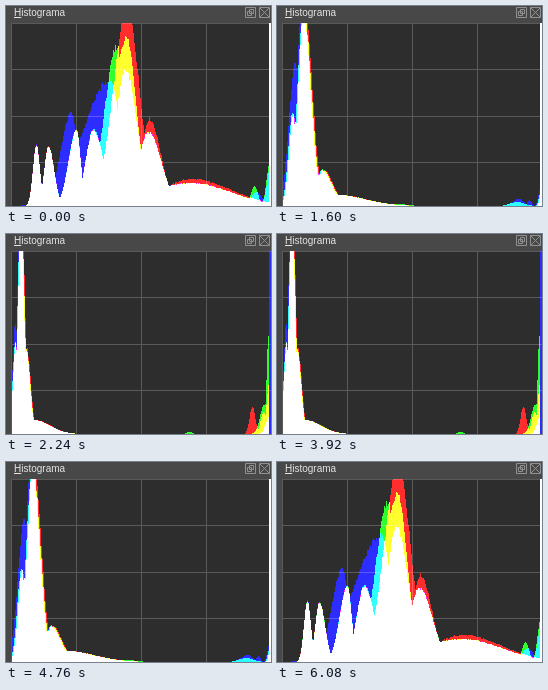
Write an HTML page with a canvas that moves like this. It is 265x200 px and loops after 6760 ms.

```html
<!DOCTYPE html>
<html lang="es">
<head>
<meta charset="utf-8">
<title>Histograma</title>
<style>
html, body { margin: 0; width: 100%; height: 100%; overflow: hidden; background: #484848; }
canvas, svg { position: absolute; left: 0; top: 0; }
h1 { position: absolute; left: 8px; top: 1px; margin: 0; font: 10px/12px "Liberation Sans", sans-serif; color: #e4e4e4; }
</style>
</head>
<body>
<canvas width="265" height="200"></canvas>
<h1><u>H</u>istograma</h1>
<svg width="265" height="17" fill="none" stroke="#909090">
  <path d="M239.5 1.5h10v10h-10zM243.5 3.5h4v4h-4zM241.5 5.5h4v4h-4zM253.5 1.5h10v10h-10zM254 2l9 9m0-9l-9 9"/>
</svg>
<script>
const LEFT = 6, TOP = 17, BOTTOM = 200;
const ctx = document.querySelector('canvas').getContext('2d');

// A bell curve whose two sides may fall off at different rates.
const hump = (center, height, left, right = left) => x => {
  const d = x - center;
  return height * Math.exp(-((d / (d < 0 ? left : right)) ** 2));
};

// "all" is shared by the channels; "shift" moves it right for red, left for blue.
const bright = {
  shift: 0, edge: '#fff',
  all: [hump(30, 61, 5), hump(42, 60, 6, 8), hump(70, 76, 11, 6), hump(87, 76, 11, 14),
    hump(142, 74, 14, 18), hump(185, 23, 60, 55)],
  r: [hump(121, 195, 20, 17), hump(143, 87, 12, 16), hump(185, 27, 40, 55)],
  g: [hump(111, 160, 18, 8), hump(120, 168, 20, 14), hump(248, 20, 5), hump(264, 48, 5)],
  b: [hump(65, 93, 15, 8), hump(104, 126, 38, 14), hump(119, 136, 14, 16), hump(250, 14, 8), hump(264, 38, 5)]
};
const medium = {
  shift: 1.5, edge: '#fff',
  all: [hump(16, 80, 5), hump(47, 200, 13, 12), hump(67, 59, 14, 13), hump(90, 15, 30, 65), hump(264, 56, 4)],
  r: [hump(33, 85, 9)],
  g: [hump(23, 85, 4), hump(35, 110, 10), hump(178, 6, 10)],
  b: [hump(27, 105, 10), hump(46, 195, 19, 10), hump(230, 3, 30)]
};
const dim = {
  shift: 1, edge: '#fff',
  all: [hump(15, 92, 6), hump(26, 200, 8.5, 11), hump(45, 36, 10, 14), hump(60, 11, 20, 40), hump(264, 18, 3)],
  r: [],
  g: [hump(120, 2, 14), hump(240, 4, 10)],
  b: [hump(18, 145, 9, 6), hump(242, 7, 10, 6), hump(252, 6, 3)]
};
const dark = {
  shift: 0.5, edge: '#22f',
  all: [hump(9, 92, 4, 3), hump(14.5, 230, 4.5, 4.8), hump(20, 85, 4, 5.5), hump(28, 14, 10, 22)],
  r: [hump(246, 27, 4), hump(257, 22, 4), hump(263, 52, 4)],
  g: [hump(183, 2, 4), hump(258, 30, 6), hump(262, 101, 2.5)],
  b: [hump(9, 112, 4, 3), hump(263, 18, 5)]
};
const darkest = {
  shift: 0, edge: null,
  all: [hump(8.5, 260, 9, 3.4), hump(12, 85, 3, 6), hump(20, 8, 10)],
  r: [hump(168, 11, 8, 12), hump(193, 18, 10)],
  g: [hump(175, 5, 10), hump(194, 31, 9, 8)],
  b: [hump(72, 3, 25, 8), hump(170, 4, 10), hump(198, 20, 8, 3), hump(203, 43, 4)]
};

const DURATION = 6760;
const schedule = [
  [0, bright], [920, medium], [1600, dim], [2240, dark], [3040, darkest],
  [3920, dark], [4760, dim], [5400, medium], [6080, bright]
];

// Repeatable roughness, from -1 to 1.
function grain(x, seed) {
  const n = Math.sin(x * 12.9898 + seed * 78.233) * 43758.5453;
  return 2 * (n - Math.floor(n)) - 1;
}

function drawChannel(shared, own, shift, color, seed) {
  ctx.fillStyle = color;
  for (let x = LEFT; x < 263; x++) {
    const level = Math.max(...shared.map(f => f(x - shift)), ...own.map(f => f(x)));
    const rough = level * (1 + 0.025 * grain(x, seed));
    const height = Math.min(BOTTOM - TOP, Math.round(rough));
    ctx.fillRect(x, BOTTOM - height, 1, height);
  }
}

function drawPanel() {
  ctx.fillStyle = '#484848';
  ctx.fillRect(0, 0, 265, 200);
  ctx.fillStyle = '#2d2d2d';
  ctx.fillRect(LEFT, TOP, 259, 183);
  ctx.fillStyle = '#5a5a5a';
  for (const x of [5, 70, 135, 200]) ctx.fillRect(x, TOP, 1, 183);
  for (const y of [17, 63, 110, 156]) ctx.fillRect(LEFT, y, 259, 1);
}

function draw({ shift, edge, all, r, g, b }) {
  ctx.globalCompositeOperation = 'source-over';
  drawPanel();
  ctx.globalCompositeOperation = 'lighten';
  drawChannel(all, r, shift, '#f00', 1);
  drawChannel(all, g, 0, '#0f0', 2);
  drawChannel(all, b, -shift, '#00f', 3);
  if (edge) {
    ctx.fillStyle = edge;
    ctx.fillRect(263, TOP, 2, 183);
  }
}

let shown = null;
function tick() {
  const time = performance.now() % DURATION;
  const [, histogram] = schedule.findLast(([start]) => start <= time);
  if (histogram !== shown) draw(shown = histogram);
  requestAnimationFrame(tick);
}
tick();
</script>
</body>
</html>
```
